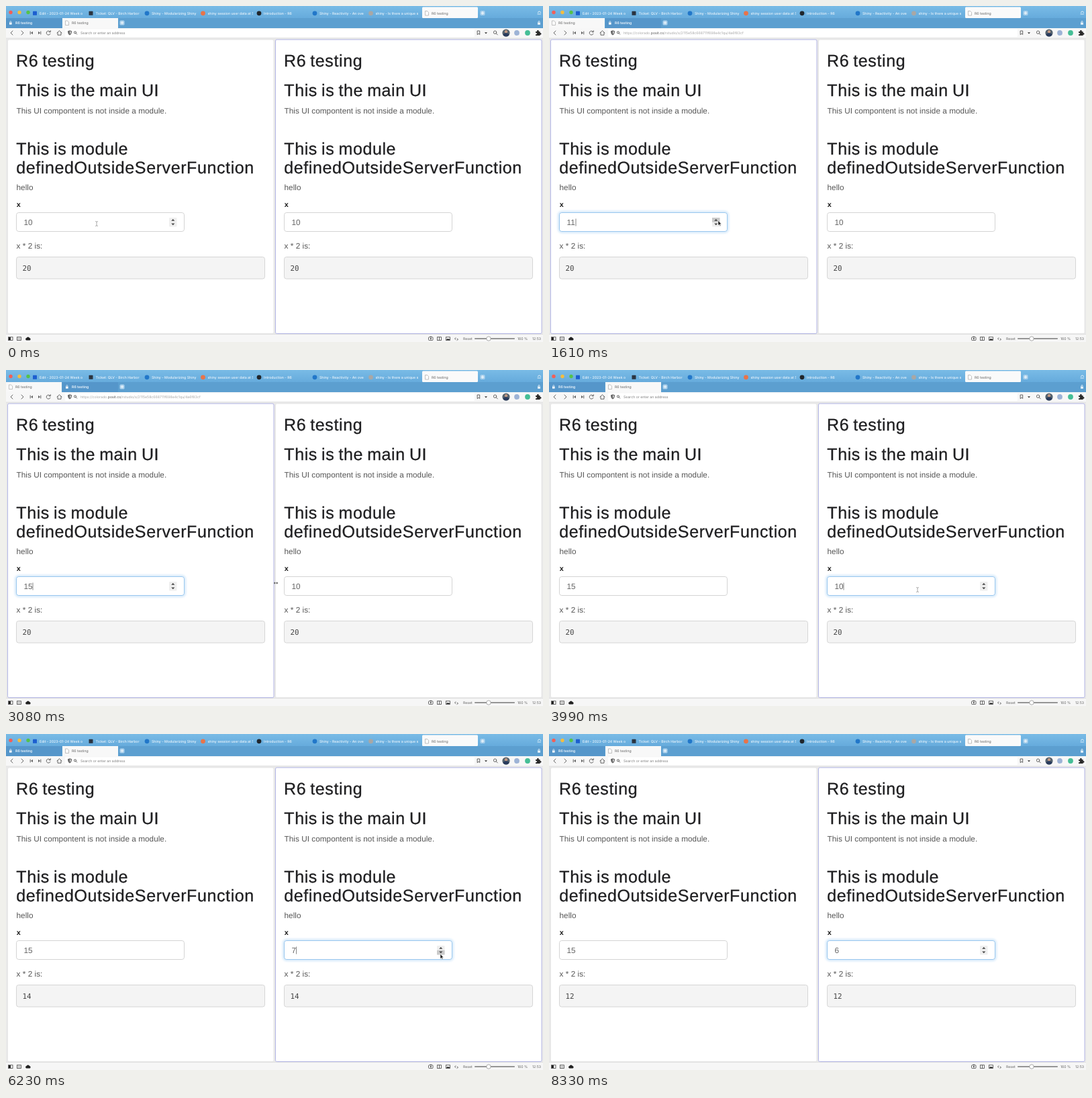
An HTML page that plays this animation: 800x500 px, repeating every 8400 ms.

```html
<!DOCTYPE html>
<html lang="en">
<head>
<meta charset="utf-8">
<title>R6 testing</title>
<style>
  html, body { margin: 0; width: 100%; height: 100%; overflow: hidden; background: #fff; }
  svg { display: block; width: 800px; height: 500px; }
  text { white-space: pre; text-rendering: geometricPrecision; }
  .ui { font: 5.2px Inter, "Open Sans", sans-serif; }
  .tab { fill: #eef6fc; font-weight: 500; }
  .dark { fill: #666; }
  .head { font: 25px "Liberation Sans", Arial, sans-serif; letter-spacing: .6px; word-spacing: -1.4px; fill: #1f1f21; stroke: #1f1f21; stroke-width: .3px; }
  .body { font: 11.76px "Liberation Sans", Arial, sans-serif; letter-spacing: .04px; fill: #555; }
  .label { font: bold 10.8px "Liberation Sans", Arial, sans-serif; fill: #1c1c1c; }
  .mono { font: 10.9px "DejaVu Sans Mono", monospace; fill: #444; }
  .line { fill: none; stroke: #555; stroke-width: .9; stroke-linecap: round; stroke-linejoin: round; }
</style>
</head>
<body>
<svg id="stage" viewBox="0 0 800 500"></svg>
<script>
const LOOP = 8400;
const PANE_SHIFT = 399;
const stage = document.getElementById('stage');
const $ = id => document.getElementById(id);

// SVG string helpers
const rect = (x, y, w, h, fill, more = '') =>
  `<rect x="${x}" y="${y}" width="${w}" height="${h}" fill="${fill}" ${more}/>`;
const dot = (x, y, r, fill, more = '') =>
  `<circle cx="${x}" cy="${y}" r="${r}" fill="${fill}" ${more}/>`;
const line = (d, more = '') => `<path class="line" d="${d}" ${more}/>`;
const solid = (d, fill, more = '') => `<path d="${d}" fill="${fill}" ${more}/>`;
const text = (x, y, cls, str, more = '') =>
  `<text x="${x}" y="${y}" class="${cls}" ${more}>${str}</text>`;
const page = (x, y) =>
  solid(`M${x} ${y}h3l2 2v4.5h-5z`, '#fff', 'stroke="#999" stroke-width=".6"');
const plus = (x, y) =>
  rect(x - 3.5, y - 3.5, 7, 7, '#a9d0ec', 'rx="1.5"') +
  line(`M${x - 2} ${y}h4M${x} ${y - 2}v4`, 'style="stroke:#fff"');
const lens = (x, y, r) =>
  line(`M${x + r} ${y}a${r} ${r} 0 1 0 ${-2 * r} 0a${r} ${r} 0 1 0 ${2 * r} 0M${x + r * .7} ${y + r * .7}l${r} ${r}`);

function topTabs() {
  const tabs = [
    [43, '#1d5fd0', 'sq', 'Edit - 2023-01-24 Week o'],
    [126.5, '#2b3440', 'sq', 'Ticket: QLV - Birch Harbor'],
    [210, '#2277c9', '', 'Shiny - Modularizing Shiny'],
    [293.5, '#e8744a', '', 'shiny session user data at S'],
    [377, '#20262c', '', 'Introduction - R6'],
    [460, '#2277c9', '', 'Shiny - Reactivity - An ove'],
    [543.5, '#a9a7a5', '', 'shiny - Is there a unique s']
  ];
  const marks = tabs.map(([x, fill, kind, label], i) =>
    (kind ? rect(x - 3, 7.8, 6, 6, fill, 'rx=".6"') : dot(x, 10.8, 3.4, fill)) +
    `<clipPath id="cut${i}">${rect(x, 2, 74.5, 16, '#000')}</clipPath>` +
    text(x + 7, 12.6, 'ui tab', label, `clip-path="url(#cut${i})"`)).join('');
  const lights = ['#f35f57', '#f5bd3f', '#55c24a'].map((c, i) => dot(7 + 13 * i, 9.5, 2.7, c)).join('');
  return rect(0, 0, 800, 18, 'url(#bar)') + lights + marks +
    rect(620, 1.5, 83, 16.5, '#fafafa', 'rx="1.5"') + page(624.5, 7.5) + text(634, 12.6, 'ui dark', 'R6 testing') +
    plus(710, 10.5) +
    line('M792 12h4.5M792.5 10a2 2 0 0 1 4 0', 'style="stroke:#e9f4fb"');
}

function pageTabs() {
  const tab = (x, side) =>
    `<g id="${side}On">${rect(x, 18, 83, 15, '#f8f8f8')}${page(x + 4.5, 22)}${text(x + 14, 27.4, 'ui dark', 'R6 testing')}</g>` +
    `<g id="${side}Off">${rect(x, 18, 83, 15, '#5596ca')}${rect(x + 5, 24.6, 3.6, 3, '#fff')}` +
    line(`M${x + 5.8} 24.5v-1a1 1 0 0 1 2 0v1`, 'style="stroke:#fff;stroke-width:.6"') +
    text(x + 14, 27.4, 'ui tab', 'R6 testing', 'style="font-weight:600"') + '</g>';
  return rect(0, 18, 800, 15, '#5c9fd0') +
    tab(0, 'left') + tab(84, 'right') + plus(173, 25) +
    rect(792, 24.5, 4, 3.3, '#e4f0f8') + line('M793 24.5v-1a1 1 0 0 1 2.2 0', 'style="stroke:#e4f0f8"');
}

function toolbar() {
  const address = 'https://colorado.<tspan fill="#555">posit.co</tspan>/rstudio/s/2115e58c668711f698e4c1qu/4a6f83cf';
  const skip = (x, s) =>
    solid(`M${x - s} 40l${3 * s} -2.2v4.4z`, '#666') + line(`M${x - 1.8 * s} 38v4`);
  return rect(0, 33, 800, 15, '#f7f7f7') + rect(0, 47.5, 800, 1, '#e2e2e2') +
    rect(88, 34.5, 610, 11.5, '#fff', 'rx="1.5"') +
    line('M10 37l-3 3 3 3') + line('M23 37l3 3-3 3') + skip(38, 1) + skip(50, -1) +
    line('M65.8 38.5a3 3 0 1 0 .2 2.8M66.3 36.6v2.2h-2.2') +
    line('M76 40l3.5-3.2L83 40M77 39.6v3.6h5v-3.6') +
    solid('M92 37.2l3-.9 3 .9c0 3-.7 5-3 6.3c-2.3-1.3-3-3.3-3-6.3z', '#666') +
    solid('M95 37.5l1.7.5c0 2-.5 3.2-1.7 4z', '#ddd') + lens(103, 39.4, 1.6) +
    text(111, 42, 'ui', address, 'id="url" fill="#a5a5a5"') +
    text(111, 42, 'ui', 'Search or enter an address', 'id="hint" fill="#808080"') +
    line('M702.5 37h3.2v5.5l-1.6-1.5-1.6 1.5z') +
    solid('M713 39.3h4l-2 2.2z', '#333') + lens(728.6, 39.2, 2.2) +
    dot(745, 40, 5.6, '#55636f') + solid('M740.5 43.2a4.7 4 0 0 1 9 0a5.6 5.6 0 0 1-9 0z', '#283a5c') + dot(745, 38.2, 2.1, '#c49a84') +
    dot(761, 40, 3.9, '#9db3d6') + dot(777, 40, 3.9, '#45be96') +
    solid('M789 38h2.2a1.4 1.4 0 1 1 2.4 0h2v2.2a1.3 1.3 0 1 1 0 2.3v1.5h-6.6v-1.8a1.3 1.3 0 1 0 0-2.3z', '#2a2a2a');
}

function statusBar() {
  const frame = (x, w, more = '') =>
    rect(x, 492.7, w, 4.8, 'none', `stroke="#444" stroke-width=".8" ${more}`);
  return rect(0, 488.5, 800, 11.5, '#f6f6f6') + rect(0, 488, 800, .8, '#dcdcdc') +
    frame(3.5, 6.5) + rect(4, 493, 3, 4, '#222') +
    frame(16.5, 6) + line('M18 494.3h3M18 496h3', 'style="stroke-width:.5"') +
    solid('M30.5 497.5a1.8 1.8 0 0 1 0-3.5a2.5 2.5 0 0 1 4.6 0a1.8 1.8 0 0 1 .2 3.5z', '#222') +
    frame(629.5, 6.5, 'rx="1"') + dot(632.8, 495.2, 1.1, '#444') + rect(631.5, 491.8, 2.6, 1.2, '#444') +
    frame(642.5, 6) + line('M645.5 493v4') +
    frame(655.5, 6) + solid('M656 497l1.7-2.2 1.3 1 1-.8 1.2 2z', '#222') +
    line('M670 493.8l-1.5 1.3 1.5 1.3M672 495l1.5 1.2-1.5 1.2') +
    text(681, 497, 'ui dark', 'Reset') + rect(698, 494.3, 60, 1.5, '#777', 'rx=".7"') +
    dot(719, 495, 3.2, '#fff', 'stroke="#888" stroke-width=".7"') +
    text(762, 497, 'ui dark', '160 %') + text(784, 497, 'ui dark', '12:53');
}

function pane(side, shift) {
  return `<g transform="translate(${shift})">
    ${rect(2.5, 50, 396.5, 437.5, '#fff', `id="${side}Frame" rx="2"`)}
    ${text(15, 90.3, 'head', 'R6 testing')}
    ${text(15.3, 134.3, 'head', 'This is the main UI')}
    ${text(15.5, 160, 'body', 'This UI compontent is not inside a module.')}
    ${text(15.3, 221.3, 'head', 'This is module')}
    ${text(15.3, 248.8, 'head', 'definedOutsideServerFunction')}
    ${text(15.5, 274, 'body', 'hello')}
    ${text(15.7, 299.3, 'label', 'x')}
    <g id="${side}Glow">${rect(14.5, 306.5, 252, 30, 'none', 'rx="4.5" stroke="#8cc3f2" stroke-width="3" stroke-opacity=".4" filter="url(#soft)"')}</g>
    ${rect(15.5, 307.5, 250, 28, '#fff', `id="${side}Box" rx="3.4" stroke-width=".9"`)}
    ${text(26.5, 325.8, 'body', '', `id="${side}Value" style="fill:#666"`)}
    ${rect(0, 316.5, .8, 11, '#666', `id="${side}Caret"`)}
    <g id="${side}Spin">
      ${rect(243, 315, 11.5, 13.5, '#efefef', 'rx="1"')}
      ${rect(243, 315, 11.5, 6.7, '#cacaca', `id="${side}Shade"`)}
      ${solid('M246.2 319.8h5.2l-2.6-2.7zM246.2 323.6h5.2l-2.6 2.7z', '#444')}
    </g>
    ${text(15.5, 360.5, 'body', 'x * 2 is:')}
    ${rect(15.5, 373.5, 370, 32.5, '#f4f4f4', 'rx="3.2" stroke="#d2d2d2" stroke-width=".9"')}
    ${text(24.5, 393.5, 'mono', '', `id="${side}Out"`)}
  </g>`;
}

stage.innerHTML = `<defs>
    <linearGradient id="bar" x1="0" y1="0" x2="0" y2="1"><stop stop-color="#79bbe6"/><stop offset="1" stop-color="#66abdc"/></linearGradient>
    <filter id="soft" x="-5%" y="-40%" width="110%" height="180%"><feGaussianBlur stdDeviation="1.5"/></filter>
  </defs>` +
  rect(0, 0, 800, 500, '#e9e9e9') + topTabs() + pageTabs() + toolbar() +
  pane('left', 0) + pane('right', PANE_SHIFT) + statusBar() +
  `<g id="pointer">
    <path id="beam" class="line" style="stroke:#888;stroke-width:.7" d="M-1.5 -3.5q1.5 0 1.5 1v5q0 1 -1.5 1M1.5 -3.5q-1.5 0 -1.5 1M0 2.5q0 1 1.5 1"/>
    <path id="arrow" d="M0 -1.5v7l1.7-1.5 1.2 2.5 1-.5-1.2-2.4h2.2z" fill="#111" stroke="#fff" stroke-width=".5"/>
    <path id="resize" d="M-3.5 0l2.5-2v1.4h2v-1.4l2.5 2-2.5 2v-1.4h-2v1.4z" fill="#555" stroke="#fff" stroke-width=".3"/>
  </g>`;

// Step tables: [time, value]
const steps = {
  focus: [[0, ''], [280, 'left'], [3570, 'right']],
  active: [[0, 'right'], [280, 'left'], [3570, 'right']],
  left: [[0, 10], [1540, 11], [1820, 12], [2100, 13], [2310, 14], [2590, 15]],
  right: [[0, 10], [4690, 9], [5250, 8], [5810, 7], [6720, 6]],
  out: [[0, 20], [5040, 18], [5740, 16], [6160, 14], [7070, 12]]
};
// Pointer path: [time, x, y]
const path = [
  [0, 135, 324], [70, 135, 324], [420, 217, 324], [1050, 217, 324], [1400, 252, 321],
  [2700, 252, 321], [3080, 402, 317], [3430, 549, 327], [4060, 549, 327],
  [4500, 647, 329], [7280, 647, 329], [7840, 700, 512], [LOOP, 700, 512]
];

const last = (table, t) => table.filter(s => s[0] <= t).pop();
const show = (id, on) => { $(id).style.display = on ? '' : 'none'; };
const put = (id, str) => { if ($(id).textContent !== str) $(id).textContent = str; };

function pointerAt(t) {
  const i = Math.max(1, path.findIndex(p => p[0] > t));
  const [t0, x0, y0] = path[i - 1], [t1, x1, y1] = path[i];
  const u = (t - t0) / (t1 - t0), k = u * u * (3 - 2 * u);
  return [x0 + (x1 - x0) * k, y0 + (y1 - y0) * k];
}

function draw(t) {
  const [focusTime, focus] = last(steps.focus, t);
  const active = last(steps.active, t)[1];
  const [x, y] = pointerAt(t);
  let kind = Math.abs(x - 402) < 4 ? 'resize' : 'arrow';

  ['left', 'right'].forEach((side, i) => {
    const px = x - i * PANE_SHIFT;
    const inBox = px > 15 && px < 266 && y > 307 && y < 336;
    const onSpin = inBox && px > 240 && px < 257;
    if (inBox && !onSpin) kind = 'beam';

    const [changed, value] = last(steps[side], t);
    const focused = focus === side;
    const blinkStart = Math.max(changed, focusTime);
    put(side + 'Value', String(value));
    put(side + 'Out', String(last(steps.out, t)[1]));
    show(side + 'Glow', focused);
    $(side + 'Box').setAttribute('stroke', focused ? '#8fc1ec' : '#d0d0d0');
    show(side + 'Caret', focused && (t - blinkStart) % 1000 < 500);
    $(side + 'Caret').setAttribute('x', value > 9 ? 39.6 : 33.1);
    show(side + 'Spin', focused || inBox);
    show(side + 'Shade', onSpin);
    $(side + 'Shade').setAttribute('y', y < 322 ? 315 : 321.8);
    $(side + 'Frame').setAttribute('stroke', active === side ? '#b3b6e6' : '#e6e6e6');
    show(side + 'On', active === side);
    show(side + 'Off', active !== side);
  });

  show('url', active === 'left');
  show('hint', active === 'right');
  ['beam', 'arrow', 'resize'].forEach(k => show(k, k === kind));
  $('pointer').setAttribute('transform', `translate(${x.toFixed(2)} ${y.toFixed(2)})`);
}

const start = performance.now();
function tick() {
  draw((performance.now() - start) % LOOP);
  requestAnimationFrame(tick);
}
tick();
</script>
</body>
</html>
```
